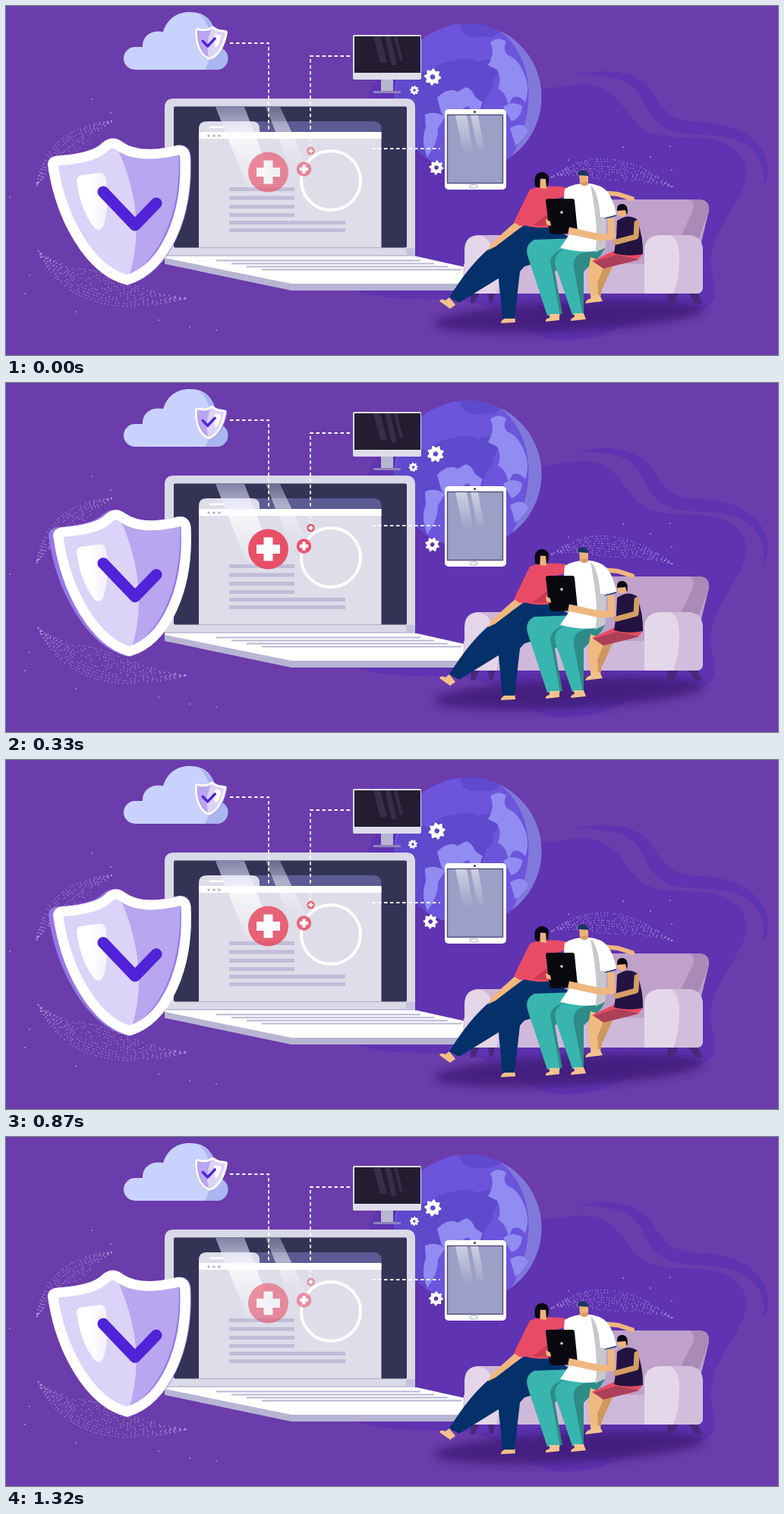
Animation of 1017 by 460 pixels, one loop 1.35 s. Source, as an HTML page:

```html
<!DOCTYPE html>
<html lang="en">
<head>
<meta charset="utf-8">
<title>Family health protection</title>
<style>
html, body { margin: 0; width: 100%; height: 100%; overflow: hidden; background: #6b3cab; }
svg { display: block; width: 100vw; height: 100vh; }
</style>
</head>
<body>
<svg viewBox="0 0 1017 460" preserveAspectRatio="none">
<defs>
  <linearGradient id="beam" x1="0" y1="0" x2="0" y2="1">
    <stop offset="0" stop-color="#d3d4ff" stop-opacity=".5"/>
    <stop offset=".35" stop-color="#fff" stop-opacity=".75"/>
    <stop offset="1" stop-color="#fff" stop-opacity="0"/>
  </linearGradient>
  <linearGradient id="shine" x1="0" y1="0" x2="0" y2="1">
    <stop offset="0" stop-color="#fff" stop-opacity=".5"/>
    <stop offset="1" stop-color="#fff" stop-opacity="0"/>
  </linearGradient>
  <linearGradient id="gloss">
    <stop offset=".45" stop-color="#fff"/>
    <stop offset="1" stop-color="#f4f0fd"/>
  </linearGradient>
  <filter id="blur" x="-20%" y="-60%" width="140%" height="220%"><feGaussianBlur stdDeviation="6"/></filter>
  <clipPath id="globeClip"><circle cx="608.5" cy="120" r="97"/></clipPath>
  <path id="shape" d="M69 206Q67 200 74 199C112 196 128 189 136 180Q145 172 154 180C171 192 196 193 228 185Q236 184 237 193C241 273 211 341 163 356C116 343 79 276 69 206Z"/>
  <clipPath id="shapeClip"><use href="#shape"/></clipPath>
  <path id="plus" d="M-6-15.500h12v9.500h9.500v12h-9.500v9.500h-12v-9.500h-9.500v-12h9.500z"/>
</defs>

<!-- backdrop -->
<rect width="1017" height="460" fill="#6b3cab"/>
<path fill="#5f33b1" d="M478 120C482 92 510 80 550 95L705 109C738 107 752 100 776 105C812 115 815 147 842 164C870 179 906 168 938 178C967 186 981 209 973 233C962 267 934 292 929 330C926 350 937 368 933 386C922 410 890 397 855 405C815 414 805 438 738 441C690 441 680 414 630 395C590 380 515 393 463 376L500 250Z"/>
<path fill="#5f33b1" d="M752 90C790 82 830 84 850 111C866 137 874 150 909 153C968 153 1005 181 1004 221Q1002 234 996 239Q1003 218 990 198C973 172 944 171 906 169C865 167 852 153 840 127C828 97 800 91 752 90Z"/>
<path id="dots" fill="none" stroke="#e6d8fa" stroke-width="1.400" stroke-linecap="round" opacity=".6"/>
<path id="specks" fill="none" stroke="#eee4ff" stroke-width="1.700" stroke-linecap="round" opacity=".75"/>

<!-- globe -->
<g clip-path="url(#globeClip)">
  <rect x="510" y="20" width="200" height="200" fill="#6c55dc"/>
  <path fill="#5f49cc" d="M595 20Q630 20 652 32Q644 43 630 40Q615 44 603 36ZM517 95Q540 82 556 89Q572 72 590 73Q607 65 622 74Q638 66 647 76Q651 88 641 99Q644 111 633 117L627 137Q617 130 611 114Q600 122 590 124Q577 129 569 148L562 184L545 212Q519 193 507 147Z"/>
  <path fill="#8079db" d="M648 31C694 63 702 133 666 199L637 222H720V25Z"/>
  <path fill="#918cf1" d="M638 48Q648 39 659 47Q654 57 660 64Q674 69 682 88Q691 107 684 127Q676 116 667 121L662 131Q658 113 648 109Q654 96 647 84L635 78Q645 62 638 48Z"/>
  <path fill="#918cf1" d="M568 121Q583 106 595 113L606 107Q614 109 618 120L628 127Q621 140 630 156Q618 150 610 132Q598 134 584 157Q577 147 573 139ZM552 143Q567 137 578 147L569 161Q570 179 555 199Q546 178 553 160Z"/>
  <path fill="#918cf1" d="M655 133Q667 124 680 132Q679 147 666 152ZM664 161Q681 151 688 164Q681 177 671 184Z"/>
</g>

<!-- cloud -->
<path fill="#c9d2ff" d="M170 84A15 15 0 0 1 170 54H180C179 40 191 31 207 34C212 18 224 8 242 8C265 8 277 22 278 54A15 15 0 0 1 276 84Z"/>
<path fill="#a9b6ef" d="M255 11C272 17 279 34 279 54A15 15 0 0 1 276 84H262C276 60 273 28 255 11Z"/>

<!-- monitor -->
<rect x="494" y="95" width="16" height="18" fill="#b7b5d0"/>
<rect x="484" y="112" width="36" height="3" fill="#8e83bd"/>
<rect x="457" y="38" width="90" height="59" rx="2" fill="#deddea"/>
<rect x="459" y="40" width="87" height="48" fill="#241d32"/>
<path fill="#4b4560" opacity=".45" d="M484 40h9l9 35h-9zM499 40h7l9 38h-7zM511 40h4l8 32h-4z"/>

<!-- laptop -->
<path fill="#dad9e8" d="M209 330V134Q209 122 221 122H527Q539 122 539 134V330Z"/>
<path fill="#c5c3dc" d="M209 319H539V331H209Z"/>
<path fill="#dad9e8" d="M221 316H527V328H209V319Z"/>
<rect x="221" y="132.500" width="307" height="186" rx="2" fill="#343356"/>
<path fill="#5c5b94" d="M300 152H484Q494.500 152 494.500 162V168H300Z"/>
<path fill="#dedde9" d="M254 318.500V162Q254 152 264 152H324Q334 152 334 162V168H494.500V318.500Z"/>
<path fill="#fff" d="M254 166H494.500V175H254ZM268 158.500H287V161H268Z"/>
<g fill="#aaa7c8"><circle cx="267" cy="171" r="1.600"/><circle cx="274" cy="171" r="1.600"/><circle cx="281" cy="171" r="1.600"/></g>
<path fill="#bfbdd8" d="M294 239h86v5h-86zm0 11.500h86v5h-86zm0 11.500h86v5h-86zm0 11h86v5h-86zm0 10h153v5h-153zm0 10h153v5h-153z"/>
<path fill="url(#beam)" d="M276 133H314L359 249H322Z"/>
<path fill="url(#beam)" opacity=".7" d="M342 133H361L399 215H375Z"/>
<circle cx="428" cy="230" r="39" fill="none" stroke="#fff" stroke-width="4"/>
<path fill="#b8b5d4" d="M209 331L376 362H612V375H376L209 340Z"/>
<path fill="#fff" d="M209 330H541L613 346V366H376L209 332Z"/>
<g id="keys" stroke="#bab7d5" stroke-width="2"></g>

<path fill="none" stroke="#fff" stroke-width="1.800" stroke-dasharray="4.500 3.500" d="M295 49H346V164M453 66H401V184M482 188H572"/>
<g id="badges"></g>

<!-- tablet -->
<rect x="578" y="136" width="81" height="106" rx="5" fill="#fff"/>
<rect x="581.500" y="143.500" width="73" height="90" fill="#9c9fc6" stroke="#504b7e" stroke-width="1.400"/>
<path fill="url(#shine)" d="M592 144H607L616 196H603ZM612 144H622L630 190H621Z"/>
<circle cx="617.500" cy="139.500" r="1.500" fill="#38324f"/>
<rect x="611" y="235.500" width="10" height="4.500" rx="2.200" fill="none" stroke="#908eaa" stroke-width=".8"/>

<g id="gears"></g>

<!-- sofa -->
<ellipse cx="742" cy="409" rx="178" ry="20" transform="rotate(-3 742 409)" fill="#3f1c78" opacity=".85" filter="url(#blur)"/>
<path fill="#47297b" d="M612 377H625L617 392H612ZM635 377H645L641 391H637ZM871 377H886L880 392H872ZM898 377H911L917 392H908Z"/>
<path fill="#bfa1ca" d="M730 345V266Q730 255 741 255H914Q927 256 926 270L909 340H730Z"/>
<path fill="#aa8ab7" d="M901 255H914Q927 256 926 270L913 305H888L905 270Q908 260 901 255Z"/>
<path fill="#cfb9da" d="M603 340H850V379H610Q602 379 602 370Z"/>
<path fill="#e4d5e9" d="M604 378V322Q604 302 624 302H661L646 379H610Z"/>
<path fill="#cfb5d9" d="M620 302H659Q674 304 673 323V350H640V321Q638 304 620 302Z"/>
<path fill="#e5d7ea" d="M841 379V321Q842 302 864 302H898Q918 303 918 323V370Q918 379 909 379Z"/>
<path fill="#d3bddd" d="M875 302H898Q918 303 918 323V370Q918 379 909 379H879Q887 360 887 334Q887 307 875 302Z"/>

<!-- woman -->
<path fill="#f3c08a" d="M584 384L592 394L585 399L571 389Q572 385 579 388ZM656 408H670L671 417L652 418Q652 414 657 412Z"/>
<path fill="#04316a" d="M682 290L718 291L741 304L716 333L665 349L597 391L584 384Q610 342 636 320Z"/>
<path fill="#04316a" d="M711 307L690 335L677 350L670 412H654L648 350Q650 339 668 331Z"/>
<path fill="#f0b77f" d="M674 282L683 288L645 317L635 322L639 313Z"/>
<path fill="#e94b66" d="M690 242Q706 235 737 239L741 250L720 255L723 291Q698 294 683 289L677 290L669 285Z"/>
<path fill="#c93b55" d="M716 272L722 290L694 289Z"/>
<path fill="#efb47d" d="M703 228H713V236L712 241L704 240Z"/>
<path fill="#080610" d="M697 237Q694 219 707 219Q718 221 714 236L712 239L711 228L704 227L703 239Q699 240 697 237Z"/>

<!-- man -->
<path fill="none" stroke="#f0b77f" stroke-width="6" stroke-linecap="round" d="M785 246L806 248L825 254"/>
<path fill="#2e8b88" d="M748 306L769 326L739 338L723 350L733 406H720L698 328Z"/>
<path fill="#39b5af" d="M753 306L760 317Q719 318 717 337L730 408H713L688 332Q682 315 696 308Z"/>
<path fill="#2e8b88" d="M791 316L783 329L761 350L761 405H748L729 330Z"/>
<path fill="#39b5af" d="M780 315L778 323Q744 323 748 346L760 407H746L724 343Q720 326 737 320Z"/>
<path fill="#f4c38d" d="M716 406H729V414L711 416Q710 412 716 411ZM748 405H761L764 413L744 415Q744 411 749 410Z"/>
<path fill="#fff" d="M736 241Q754 231 775 235Q798 242 804 275L789 282L790 318Q773 329 730 319L744 298Q732 270 736 241Z"/>
<path fill="#c8c7cc" d="M770 236Q780 243 783 278L791 278L790 318L776 325Q782 297 770 236Z"/>
<path fill="#fff" d="M777 236Q797 239 804 275L790 281Q781 268 780 250Z"/>
<path fill="none" stroke="#153968" stroke-width="1.500" d="M789 280L804 276"/>
<path fill="#edb17a" d="M755 222H767V234Q762 240 756 234Z"/>
<path fill="#18365f" d="M754 223V218Q764 213 768 224Z"/>
<path fill="#d99a62" d="M756 233L767 231V235Q760 240 756 234Z"/>
<path fill="#0b0910" d="M714 254H746Q749 254 749 257L753 297Q753 300 749 300L720 301Q716 300 716 297L711 257Q711 254 714 254Z"/>
<circle cx="732" cy="272" r="1.800" fill="#d8d5df"/>
<path fill="#efb880" d="M711 281L717 284L718 290L712 288Z"/>

<!-- child -->
<path fill="#cd985f" d="M779 333L802 337L785 374L782 390H772L774 369Z"/>
<path fill="#efba82" d="M770 331L790 338L779 365L781 389H771L766 355Z"/>
<path fill="#f4c38d" d="M771 382L782 381L786 389L763 392Q764 387 771 385Z"/>
<path fill="#e94b62" d="M807 320L839 326Q835 336 815 339L787 346L772 336Z"/>
<path fill="#ac4059" d="M804 328L835 334L787 346L774 337Z"/>
<path fill="#231341" d="M805 283Q819 273 831 281Q840 306 839 327Q818 331 801 326L804 305Z"/>
<path fill="none" stroke="#efb880" stroke-width="9" stroke-linejoin="round" d="M797 280L798 304L783 305L741 296"/>
<path fill="none" stroke="#d49e65" stroke-width="7" stroke-linecap="round" stroke-linejoin="round" d="M831 286L830 304L804 311"/>
<circle cx="812" cy="271" r="6.500" fill="#eeb27a"/>
<path fill="#080610" d="M805 270Q804 260 813 261Q821 263 818 276L816 269Z"/>

<g id="small"></g>
<g id="big"></g>
</svg>
<script>
const LOOP = 1350, STEP = 30;
const TIMES = [0, 240, 450, 660, 870, 1140, 1320, LOOP];
const el = id => document.getElementById(id);

// value at t, linear between poses and back to the first one
function pose(values, t) {
  const all = [...values, values[0]];
  let i = 0;
  while (t >= TIMES[i + 1]) i++;
  const p = (t - TIMES[i]) / (TIMES[i + 1] - TIMES[i]);
  return all[i] + (all[i + 1] - all[i]) * p;
}

let seed = 7;
const rnd = () => (seed = seed * 16807 % 2147483647) / 2147483647;
const dot = (x, y) => `M${x.toFixed(1)} ${y.toFixed(1)}h.01`;

// dotted band along a quadratic curve, widest in the middle
function band([x0, y0, cx, cy, x1, y1], rows, cols, width) {
  let d = '';
  for (let r = 0; r < rows; r++) for (let c = 0; c < cols; c++) {
    if (rnd() < .2 + r / rows * .4) continue;
    const u = (c + rnd() * .5) / cols, v = 1 - u;
    const tx = v * (cx - x0) + u * (x1 - cx), ty = v * (cy - y0) + u * (y1 - cy);
    const off = r / rows * width * Math.sin(Math.PI * u) / Math.hypot(tx, ty);
    d += dot(v * v * x0 + 2 * u * v * cx + u * u * x1 - ty * off,
             v * v * y0 + 2 * u * v * cy + u * u * y1 + tx * off);
  }
  return d;
}
el('dots').setAttribute('d',
  band([40, 238, 53, 158, 143, 151], 8, 34, 29) +
  band([42, 322, 89, 424, 241, 385], 11, 46, -42) +
  band([718, 226, 790, 171, 881, 240], 9, 42, 30));
const specks = [5, 252, 41, 234, 113, 123, 138, 141, 31, 355, 25, 379, 46, 331, 92, 403,
  201, 414, 242, 423, 277, 427, 813, 186, 875, 185, 849, 199, 877, 216, 741, 203];
let marks = '';
for (let i = 0; i < specks.length; i += 2) marks += dot(specks[i], specks[i + 1]);
el('specks').setAttribute('d', marks);

el('keys').innerHTML = [0, 1, 2, 3].map(i =>
  `<path d="M${277 + i * 20} ${335.5 + i * 4}H${546 + i * 18}"/>`).join('');

el('badges').innerHTML = [[345.5, 219, 26.5], [392.5, 215, 9.7], [401.5, 191, 5.2]].map(([x, y, r]) =>
  `<g transform="translate(${x} ${y}) scale(${r / 26.5})"><circle r="26.5" fill="#e94860"/><use href="#plus" fill="#fff"/></g>`).join('');

function gearPath(r) {
  let d = '';
  for (let i = 0; i < 32; i++) {
    const k = i % 4 < 2 ? 1 : .76;
    const a = (i + (i % 2 ? -.12 : .12)) * Math.PI / 16;
    d += `${i ? 'L' : 'M'}${(r * k * Math.cos(a)).toFixed(2)} ${(r * k * Math.sin(a)).toFixed(2)}`;
  }
  const h = r * .29;
  return d + `ZM${h} 0A${h} ${h} 0 1 0 ${-h} 0A${h} ${h} 0 1 0 ${h} 0Z`;
}
// x, y, radius, travel
const gears = [[562, 93.5, 11.2, 8], [538, 111, 6.2, -3], [567, 213, 9.6, -11]];
el('gears').innerHTML = gears.map(g =>
  `<path fill="#fff" fill-rule="evenodd" d="${gearPath(g[2])}"/>`).join('');

const RIGHT = 243.5, WIDE = 1.034;
const stretch = (k, dx) => `translate(${RIGHT * (1 - k) + dx} 0) scale(${k} 1)`;
const shield = `
  <use href="#shape" transform="${stretch(WIDE, 0)}" fill="#9578e7" stroke="#9578e7" stroke-width="13" stroke-linejoin="round"/>
  <g class="face">
    <use href="#shape" fill="#9578e7"/>
    <g clip-path="url(#shapeClip)">
      <path fill="#b8a6f1" d="M140 170L229 187C233 270 203 335 157 355L100 340Z"/>
      <path fill="#dcd3f8" d="M60 190L145 170Q194 270 163 360L110 345Z"/>
    </g>
    <use href="#shape" fill="none" stroke="#fff" stroke-width="13" stroke-linejoin="round"/>
  </g>
  <path fill="url(#gloss)" d="M93 225Q93 219 100 218L123 215Q131 214 132 224Q136 257 129 283Q124 295 116 287Q98 264 93 225Z"/>
  <path fill="none" stroke="#5022d8" stroke-width="15" stroke-linecap="round" stroke-linejoin="round" d="M128 240L170 284L198 255"/>`;
const shields = ['big', 'small'].map(id => {
  const g = el(id);
  g.innerHTML = shield;
  return { g, face: g.querySelector('.face') };
});

function draw(t) {
  const turn = pose([1, 0, 0, 0, 0, 1, 1], t);
  const lift = pose([5, 0, -5.5, -2.5, .8, 5, 6.3], t);
  const sink = pose([0, 2.2, 4.7, 3.6, 1.9, -.9, 0], t);
  shields[0].g.setAttribute('transform', `translate(0 ${lift})`);
  shields[1].g.setAttribute('transform', `matrix(-.228 0 0 .228 304.4 ${sink - 11.8})`);
  for (const s of shields)
    s.face.setAttribute('transform', stretch(1 + (WIDE - 1) * turn, -turn));
  el('badges').setAttribute('opacity', pose([.6, .9, 1, .95, .83, .62, .56], t));

  const swing = 1 - Math.abs(1 - t / (LOOP / 2));
  [...el('gears').children].forEach((node, i) => {
    const [x, y, r, travel] = gears[i];
    const angle = travel * swing / r * 180 / Math.PI;
    node.setAttribute('transform', `translate(${x + travel * swing} ${y}) rotate(${angle})`);
  });
}

const start = performance.now();
function tick() {
  const t = (performance.now() - start) % LOOP;
  draw(Math.floor(t / STEP) * STEP);
  requestAnimationFrame(tick);
}
tick();
</script>
</body>
</html>
```
